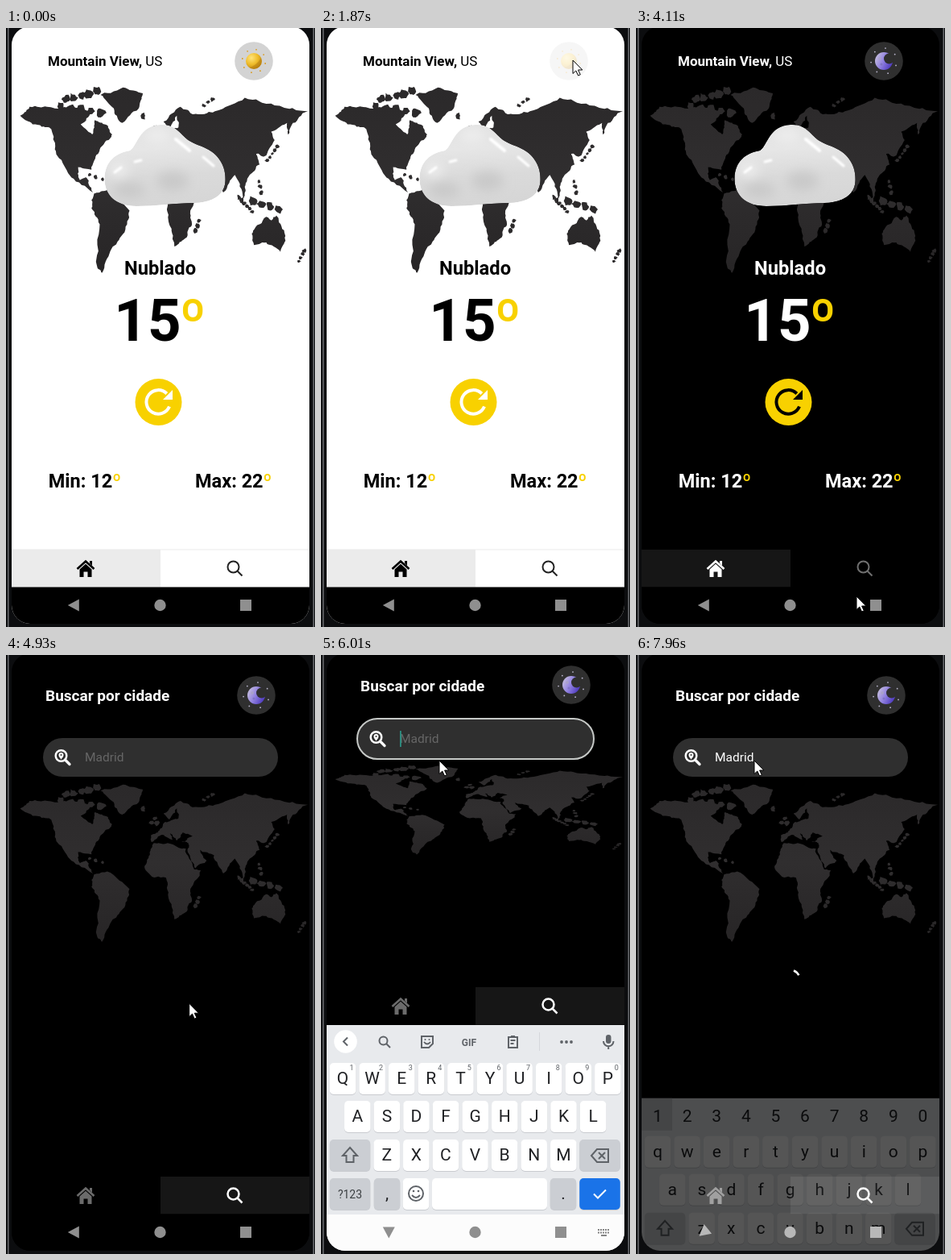
Animation, 384 px wide and 743 px high, one loop 7990 ms. Source, as an HTML page:

```html
<!DOCTYPE html>
<html lang="pt">
<head>
<meta charset="utf-8">
<title>Weather app</title>
<style>
html, body { margin: 0; width: 100%; height: 100%; overflow: hidden; background: #0c0d0f; }
svg { display: block; width: 100%; height: 100%; font-family: Roboto, "Open Sans", sans-serif; }
svg { --bg: #fff; --fg: #000; --btn: #fff; --disc: #d3d3d3; --on: #ebebeb; --idle: #222; --rule: #ececec; }
svg.dark { --bg: #000; --fg: #fff; --btn: #000; --disc: #2f2f2f; --on: #161616; --idle: #707070; --rule: #000; }
text { white-space: pre; }
.fg { fill: var(--fg); }
.b { font-weight: 700; }
.deg { fill: #f8d100; font-weight: 500; }
.key { font-size: 21px; fill: #202124; text-anchor: middle; }
.line { fill: none; stroke: #5f6368; stroke-width: 2; }
</style>
</head>
<body>
<svg id="stage" viewBox="0 0 384 743" preserveAspectRatio="none"></svg>
<script>
const LOOP = 7990;
const stage = document.getElementById('stage');

// A few capes and bays (longitude latitude); the shore between them is generated
const capes = {
  northAmerica: '-167 65 -156 71 -125 70 -95 70 -82 68 -94 59 -80 52 -77 62 -65 59 -56 52 -66 45 -76 36 -81 26 -97 28 -95 18 -87 20 -79 8 -105 20 -124 40 -132 57 -152 59',
  greenland: '-70 79 -40 83.5 -19 80 -24 70 -44 60 -54 70',
  southAmerica: '-78 7 -62 10 -35 -7 -40 -22 -57 -37 -68 -54 -74 -50 -71 -18 -81 -5',
  africa: '-6 36 11 36 33 31 43 12 51 11 40 -5 40 -16 32 -29 19 -35 12 -16 9 4 -8 5 -17 15 -10 29',
  eurasia: '-9 37 -9 43 -1 45 8 54 24 57 22 65 13 56 6 61 26 71 42 66 68 68 104 77 140 72 180 68 162 60 156 52 155 60 136 54 140 48 127 36 118 38 122 30 108 20 105 10 102 3 92 22 78 8 67 25 50 30 58 20 44 13 35 28 36 36 27 37 41 42 29 45 22 38 13 45 17 39 3 43',
  australia: '114 -23 130 -12 136 -15 142 -11 153 -27 147 -39 130 -32 115 -34'
};

let seed = 7;
const rand = () => (seed = (seed * 16807) % 2147483647) / 2147483647 - 0.5;
const project = (lon, lat) => [189.6 + 1.03 * lon, 216 - 1.48 * lat - 0.0026 * lat * Math.abs(lat)];
const polar = (r, deg) => [r * Math.cos(deg * Math.PI / 180), r * Math.sin(deg * Math.PI / 180)];

// Split each edge and nudge its middle
function roughen(pts) {
  return pts.flatMap((p, i) => {
    const q = pts[(i + 1) % pts.length];
    const d = Math.min(9, Math.hypot(q[0] - p[0], q[1] - p[1])) * 0.34;
    return [p, [(p[0] + q[0]) / 2 + rand() * d, (p[1] + q[1]) / 2 + rand() * d]];
  });
}
const shore = (pts, depth) => depth ? shore(roughen(pts), depth - 1)
  : 'M' + pts.map(p => p.map(v => v.toFixed(1)).join(' ')).join('L') + 'Z';
const coast = s => shore(s.match(/\S+ \S+/g).map(p => project(...p.split(' ').map(Number))), 3);

// Islands strung between two places
function chain([lon, lat], [lon2, lat2], count, size) {
  return Array.from({length: count}, (_, i) => {
    const p = count > 1 ? i / (count - 1) : 0;
    const [x, y] = project(lon + (lon2 - lon) * p, lat + (lat2 - lat) * p);
    return shore(Array.from({length: 6}, (_, k) => {
      const [dx, dy] = polar(size * (1 + rand() * 0.8), k * 60);
      return [x + dx, y + dy];
    }), 1);
  }).join('');
}
const islands = [
  chain([-118, 71], [-70, 67], 5, 5.5),
  chain([-112, 76], [-75, 81], 5, 5),
  chain([-83, 22], [-68, 18.5], 3, 2.2),
  chain([-19, 65], [-19, 65], 1, 4),
  chain([-8, 53], [-2, 53], 2, 3),
  chain([-2, 52], [-4, 57], 2, 2.6),
  chain([54, 72], [65, 76], 3, 2.6),
  chain([45.5, -23], [48.5, -15], 3, 3),
  chain([97, 4], [113, -8], 6, 2.7),
  chain([114, 1], [144, -6], 4, 5),
  chain([124, 8], [121, 17], 3, 2.5),
  chain([131, 33], [143, 43], 5, 2.4),
  chain([176, -38], [169, -46], 4, 2.4)
];

const text = (x, y, size, s, attrs = 'class="fg"') => `<text x="${x}" y="${y}" font-size="${size}" ${attrs}>${s}</text>`;
const rect = (x, y, w, h, fill, r = 0) => `<rect x="${x}" y="${y}" width="${w}" height="${h}" rx="${r}" fill="${fill}"/>`;
const dot = (x, y, r, fill) => `<circle cx="${x}" cy="${y}" r="${r}" fill="${fill}"/>`;
const blob = (x, y, rx, ry, fill) => `<ellipse cx="${x}" cy="${y}" rx="${rx}" ry="${ry}" fill="${fill}"/>`;
const ring = (n, r, size, fill, turn) => Array.from({length: n}, (_, i) => dot(...polar(r, turn + i * 360 / n), size, fill)).join('');
const stops = (...colors) => colors.map((c, i) => `<stop offset="${i / (colors.length - 1)}" stop-color="${c}"/>`).join('');
const cloud = 'M162 221C137 221 122 208 122.500 186C123 166 136 155 154 152C163 147 165 121 192 120C212 119 217 133 228 140C240 147 252 148 262 159C271 169 273 180 272.500 190C272 207 256 217 234 217C210 217 188 221 162 221Z';

stage.innerHTML = `
<defs>
  <clipPath id="screen"><rect x="7" y="-2" width="370" height="741" rx="23"/></clipPath>
  <clipPath id="cloudClip"><path d="${cloud}"/></clipPath>
  <linearGradient id="earth" gradientUnits="userSpaceOnUse" x1="0" y1="73" x2="0" y2="303">${stops('#2b292a', '#302e2f', '#272526')}</linearGradient>
  <linearGradient id="mist" x1="0" y1="0" x2="0.1" y2="1">${stops('#e2e2e2', '#e6e6e6', '#dadada', '#d6d6d6')}</linearGradient>
  <radialGradient id="sunFill" cx="0.35" cy="0.3" r="0.8">${stops('#ffe47c', '#efbd2c', '#b97d0c')}</radialGradient>
  <linearGradient id="moonFill" x1="0" y1="0.2" x2="1" y2="0.7">${stops('#c9c2dd', '#8f7fe0', '#4a36bd')}</linearGradient>
  <filter id="soft" x="-50%" y="-50%" width="200%" height="200%"><feGaussianBlur stdDeviation="7"/></filter>
  <filter id="glint" x="-50%" y="-50%" width="200%" height="200%"><feGaussianBlur stdDeviation="0.9"/></filter>
</defs>
${rect(0, 0, 384, 743, '#0c0d0f')}
${rect(2, 0, 1.5, 743, '#6a6c70')}${rect(381.5, 0, 1.5, 743, '#6a6c70')}
<g clip-path="url(#screen)">
  ${rect(7, -2, 370, 745, 'var(--bg)')}
  <path id="map" fill="url(#earth)" d="${Object.values(capes).map(coast).join('') + islands.join('')}"/>
  <g id="home">
    ${text(52, 47, 17, '<tspan class="b">Mountain View,</tspan> US')}
    <g clip-path="url(#cloudClip)">
      <path d="${cloud}" fill="url(#mist)"/>
      <g filter="url(#soft)">
        ${blob(153, 201, 20, 10, '#c9c9c9')}${blob(207, 190, 20, 12, '#c9c9c9')}
        ${blob(188, 133, 15, 8, '#eee')}${blob(140, 176, 12, 9, '#eee')}
      </g>
      <g filter="url(#glint)" stroke="#fff" stroke-linecap="round">
        <path d="M211 138L228 152" stroke-width="4"/><path d="M245 160L258 171M135 179L143 173M160 166L168 164" stroke-width="3"/>
      </g>
    </g>
    ${text(147, 306, 23.7, 'Nublado', 'class="fg b"')}
    ${text(134.3, 388, 72.5, '15', 'class="fg b"')}${text(215.7, 388, 72, 'º', 'class="deg"')}
    <g id="refresh">
      ${dot(189.5, 464, 29, '#f8d100')}
      <path d="M203 469.500A14.800 14.800 0 1 1 199.800 453.500" fill="none" stroke="var(--btn)" stroke-width="4"/>
      <path d="M207 449V461H195Z" fill="var(--btn)"/>
    </g>
    ${text(52.7, 570, 23.5, '<tspan class="b">Min: 12</tspan><tspan class="deg">º</tspan>')}
    ${text(235, 570, 23.5, '<tspan class="b">Max: 22</tspan><tspan class="deg">º</tspan>')}
  </g>
  <g id="search">
    ${text(49, 57, 19, 'Buscar por cidade', 'class="fg b"')}
    <g id="field">
      <rect id="box" x="46" y="103" width="292" height="48" rx="24" fill="#2f2f2f"/>
      <circle cx="68.500" cy="125" r="6.800" fill="none" stroke="#fff" stroke-width="2.500"/>
      <path d="M73.500 130L79 135.500" stroke="#fff" stroke-width="3.200" stroke-linecap="round"/>
      <path d="M68.500 129.500C66 126.500 65.500 125.500 65.500 124A3 3 0 0 1 71.500 124C71.500 125.500 71 126.500 68.500 129.500Z" fill="#fff"/>
      ${dot(68.5, 124, 1, '#2f2f2f')}
      <text id="typed" x="98" y="132" font-size="15.500"></text>
      <rect id="caret" y="117" width="1.800" height="20" fill="#2c8f82"/>
    </g>
  </g>
  <g id="toggle">
    ${dot(0, 0, 23.8, 'var(--disc)')}
    <g id="sun">${ring(8, 14.5, 0.9, '#d99a1c', 12)}${dot(0, 0, 10, 'url(#sunFill)')}<path d="M-6 8A10 10 0 0 0 9 -4Q3 6 -6 8Z" fill="#a8700a" opacity=".4"/></g>
    <g id="moon">${ring(7, 16, 0.9, '#b9b5cc', 20)}${dot(0, 0, 11, 'url(#moonFill)')}${dot(6.5, -3, 6.5, '#2f2f2f')}${dot(-5, -3, 1.8, '#aaa2c8')}${dot(-3, 4, 1.5, '#8074c4')}</g>
  </g>
  <path id="spinner" fill="none" stroke="var(--fg)" stroke-width="2.600" d="M11.300 0A11.300 11.300 0 0 1 8 8"/>
  <g id="tabBack">
    ${rect(7, 647, 370, 47, 'var(--bg)')}${rect(7, 646.5, 370, 1, 'var(--rule)')}
    <rect id="active" y="647" width="185" height="46.500" fill="var(--on)"/>
  </g>
  ${rect(7, 693.5, 370, 49.5, '#000')}
  <rect id="panel" x="7" y="459" width="370" height="284" fill="#fafafa"/>
  <g id="keys"></g>
  <rect id="navShade" x="7" y="694" width="370" height="49"/>
  <g id="tabIcons">
    <g id="houseIcon">
      <path d="M88.500 671L99 661.500L109.500 671" fill="none" stroke="currentColor" stroke-width="2.600"/>
      <path d="M104 661H107V667L104 664ZM91.500 671.500L99 664.800L106.500 671.500V681H101.500V674.500H96.500V681H91.500Z" fill="currentColor"/>
    </g>
    <g id="lensIcon" fill="none" stroke="currentColor"><circle cx="282.500" cy="668.500" r="7"/><path d="M287.500 673.500L293.500 679.500"/></g>
  </g>
  <g id="nav">
    <path id="back" d="M-7.500 0L6.500 -7.500V7.500Z"/><circle cx="191.500" cy="716" r="7.200"/><rect x="291" y="709" width="14" height="14"/>
    <g id="switcher">${Array.from({length: 10}, (_, i) => rect(344 + i % 5 * 3, i < 5 ? 712 : 715.5, 2, 2, '#858585')).join('')}${rect(348, 719, 7, 2, '#858585')}</g>
  </g>
  <path id="pointer" d="M0 0V16.500L3.800 13L6.600 19L9.300 17.800L6.600 12H11.800Z" fill="#fff" stroke="#000" stroke-width="1"/>
</g>`;

const el = Object.fromEntries([...stage.querySelectorAll('[id]')].map(n => [n.id, n]));
const show = (id, on) => { el[id].style.display = on ? '' : 'none'; };
const set = (id, attrs) => { for (const k in attrs) el[id].setAttribute(k, attrs[k]); };
const ramp = (t, a, b) => Math.max(0, Math.min(1, (t - a) / (b - a)));
const within = (t, a, b) => t >= a && t < b;

const PITCH = 36.6;
const GREY = '#cbced3';
const perKey = (s, make) => [...s].map(make).join('');
const cap = (x, y, s = '', w = 32.5, fill = '#fff') => rect(x - w / 2, y + 1, w, 39, '#c9cbd0', 5) + rect(x - w / 2, y, w, 39, fill, 5) + text(x, y + 26, 21, s, 'class="key"');
const wideCap = (x, y, fill = GREY) => cap(x, y, '', 50.5, fill);
const lens = (x, y) => `<g class="line"><circle cx="${x - 1.5}" cy="${y - 1.5}" r="5"/><path d="M${x + 2} ${y + 2}L${x + 7} ${y + 7}"/></g>`;
const mic = `${rect(354, 471, 6.5, 11, '#5f6368', 3.2)}<path class="line" d="M351 479A6.200 6.200 0 0 0 363.500 479M357.200 485V489"/>`;

function strip(mode, hints) {
  if (mode === 'digits') {
    return rect(7, 459, 38, 40, GREY) + perKey('1234567890', (c, i) => text(27 + i * PITCH, 488, 21, c, 'class="key"'));
  }
  const tip = mode === 'upper' ? 'M33 474.500L28 479.500L33 484.500' : 'M28 474.500L33 479.500L28 484.500';
  const head = dot(30.5, 479.5, 14.3, '#fff') + `<path class="line" d="${tip}"/>` + mic;
  if (mode === 'lower') {
    return head + rect(137, 468, 1, 23, '#c4c7cc') + rect(244, 468, 1, 23, '#c4c7cc') +
      hints.map((s, i) => text(90 + i * 101, 486, 17, s, 'text-anchor="middle" fill="#5f6368"')).join('');
  }
  return head + lens(79, 480) + rect(271, 468, 1, 23, '#d5d7db') +
    '<path class="line" d="M125 473H139V482L134 487H125ZM128 480Q132 485 136 480M233 474H244V487H233ZM236 473H241M235.500 478H241.500M235.500 482H239.500"/>' +
    dot(129.5, 477, 1, '#5f6368') + dot(134.5, 477, 1, '#5f6368') +
    text(184, 484.5, 12, 'GIF', 'class="b" text-anchor="middle" fill="#5f6368"') +
    [299, 305, 311].map(x => dot(x, 480, 1.9, '#5f6368')).join('');
}

function keyboard(mode, hints) {
  const row = (s, x, y) => perKey(mode === 'upper' ? s.toUpperCase() : s, (c, i) => cap(x + i * PITCH, y, c));
  const nums = mode === 'digits' ? '' : perKey('1234567890', (c, i) => text(38 + i * PITCH, 515, 9, c, 'text-anchor="middle" fill="#5f6368"'));
  return rect(7, 459, 370, 235, '#e8eaed') + rect(7, 694, 370, 280, '#fcfcfc') + strip(mode, hints) +
    row('qwertyuiop', 27, 506) + nums + row('asdfghjkl', 45.3, 553) + row('zxcvbnm', 81.7, 601) +
    wideCap(36, 601) + wideCap(346.5, 601) +
    '<path class="line" d="M36 611L45 621H40.500V629H31.500V621H27Z"/><path class="line" d="M343 613H357V629H343L336 621ZM345 617L353 625M353 617L345 625"/>' +
    wideCap(36, 649) + text(36, 674, 14, '?123', 'text-anchor="middle" fill="#3c4043"') +
    cap(82, 649, ',', 32.5, GREY) + cap(118, 649) + cap(209.5, 649, '', 143) + cap(301, 649, '.', 32.5, GREY) + wideCap(346.5, 649, '#1a73e8') +
    '<path class="line" d="M127 668A9 9 0 1 1 109 668A9 9 0 1 1 127 668M113 670Q118 676 123 670"/>' + dot(115, 665, 1.3, '#5f6368') + dot(121, 665, 1.3, '#5f6368') +
    '<path d="M339 668.500L344 673.500L354 663.500" fill="none" stroke="#fff" stroke-width="2"/>';
}

// Types a slip, deletes two letters, then finishes the word
function typedAt(t) {
  const first = Math.floor((t - 6450) / 130) + 1;
  const edits = Math.floor((t - 7330) / 80) + 1;
  if (edits < 1) return 'Madir'.slice(0, Math.max(0, first));
  return edits < 3 ? 'Madir'.slice(0, 5 - edits) : 'Madrid'.slice(0, edits + 1);
}
const hintsFor = s => s.length < 2 ? [s, 'Me', 'My'] : s.length < 3 ? [s, 'May', 'Mas'] : [s, 'Made', 'Verolina'];

// Where the pointer stops: [arrival, x, y, departure]
const visits = [[70, 309, 706], [620, 180, 407], [860, 190, 461, 1330], [1760, 313, 40, 2040], [2260, 279, 222], [2480, 192, 461, 2880],
  [3290, 310, 46], [3450, 260, 66], [3650, 273, 72, 3900], [4110, 274, 705], [4350, 284, 660, 4730], [5180, 150, 118], [5480, 147, 131]];
function pointerAt(t) {
  const i = visits.findIndex(v => v[0] > t);
  if (i < 1) return visits.at(i).slice(1, 3);
  const [arrived, x, y, left = arrived] = visits[i - 1], [next, u, v] = visits[i];
  const p = ramp(t, left, next), e = p * p * (3 - 2 * p);
  return [x + (u - x) * e, y + (v - y) * e];
}

// Touch feedback: fade to 20 %, then back
const press = (t, down, up) => t < up ? 1 - 0.8 * ramp(t, down, down + 80) : 0.2 + 0.8 * ramp(t, up, up + 200);

let keysShown = '';
function update(t) {
  const dark = t >= 1960, search = t >= 4560;
  const open = within(t, 5600, 7840), closing = t >= 7840, focus = within(t, 5540, 7840);
  const loading = within(t, 980, 1340) || within(t, 2640, 3000);
  const word = typedAt(t);
  stage.classList.toggle('dark', dark);

  const [top, height] = !search ? [73, 230] : open ? [137, 110] : [160, 195];
  const k = height / 230;
  set('map', { transform: `translate(0 ${top - 73 * k}) scale(1 ${k})`, opacity: search ? ramp(t, 4680, 4900) : 1 });

  show('home', !search && !loading);
  show('search', search);
  show('toggle', !loading);
  show('sun', !dark);
  show('moon', dark);
  set('toggle', { transform: search ? `translate(311 ${open ? 37 : 50})` : 'translate(308 41)', opacity: press(t, 1790, 1960) });
  set('refresh', { opacity: t < 1600 ? press(t, 890, 1340) : press(t, 2550, 3000) });
  show('spinner', loading || closing);
  set('spinner', { transform: `translate(192 ${search ? 402 : 323}) rotate(${-70 + (t - 7960) * 0.5})` });

  set('search', { transform: `translate(0 ${open ? -12 : 0})` });
  set('field', { transform: `translate(0 ${open ? -11 : 0})` });
  const grow = focus ? 1 : 0;
  set('box', { x: 46 - grow, y: 103 - grow, width: 292 + 2 * grow, height: 48 + 2 * grow, rx: 24 + grow, stroke: focus ? '#c6c9c7' : 'none', 'stroke-width': 2 });
  el.typed.textContent = word || 'Madrid';
  set('typed', { fill: word ? '#fff' : '#666', 'text-decoration': word && focus ? 'underline' : 'none' });
  show('caret', focus);
  if (focus) set('caret', { x: word ? 98 + el.typed.getComputedTextLength() : 98 });

  const lift = `translate(0 ${open ? -235 : 0})`;
  set('tabBack', { transform: lift });
  set('tabIcons', { transform: lift });
  set('active', { x: search ? 192 : 7 });
  el.houseIcon.style.color = closing ? '#a0a0a0' : search ? '#6b6b6b' : 'var(--fg)';
  el.lensIcon.style.color = search ? '#fff' : 'var(--idle)';
  set('lensIcon', { 'stroke-width': search ? 2.5 : 2 });

  const rise = 1 - Math.pow(1 - ramp(t, 5540, 6010), 1.766);
  const fall = ramp(t, 7840, 8140);
  show('panel', open);
  show('keys', open || closing);
  show('switcher', open);
  if (open || closing) {
    const mode = closing ? 'digits' : word ? 'lower' : 'upper';
    if (keysShown !== mode + word) {
      keysShown = mode + word;
      el.keys.innerHTML = keyboard(mode, hintsFor(word));
    }
    const drop = 280 * (closing ? Math.pow(fall, 1.24) : 1 - rise);
    set('keys', { transform: `translate(0 ${drop})`, opacity: closing ? 1 - 1.65 * fall : Math.min(1, rise * 1.25) });
  }
  set('navShade', { opacity: open ? 0.7 * (1 - ramp(t, 5670, 5950)) : 0 });
  const turn = open ? -90 * ramp(t, 5680, 5950) : closing ? -90 * (1 - 1.4 * fall) : 0;
  set('back', { transform: `translate(84.3 716) rotate(${turn})` });
  set('nav', { fill: closing ? '#b8b8b8' : '#8f8f8f' });

  show('pointer', t >= 70);
  set('pointer', { transform: `translate(${pointerAt(t).join(' ')})` });
}

function tick() {
  update(performance.now() % LOOP);
  requestAnimationFrame(tick);
}
tick();
</script>
</body>
</html>
```
